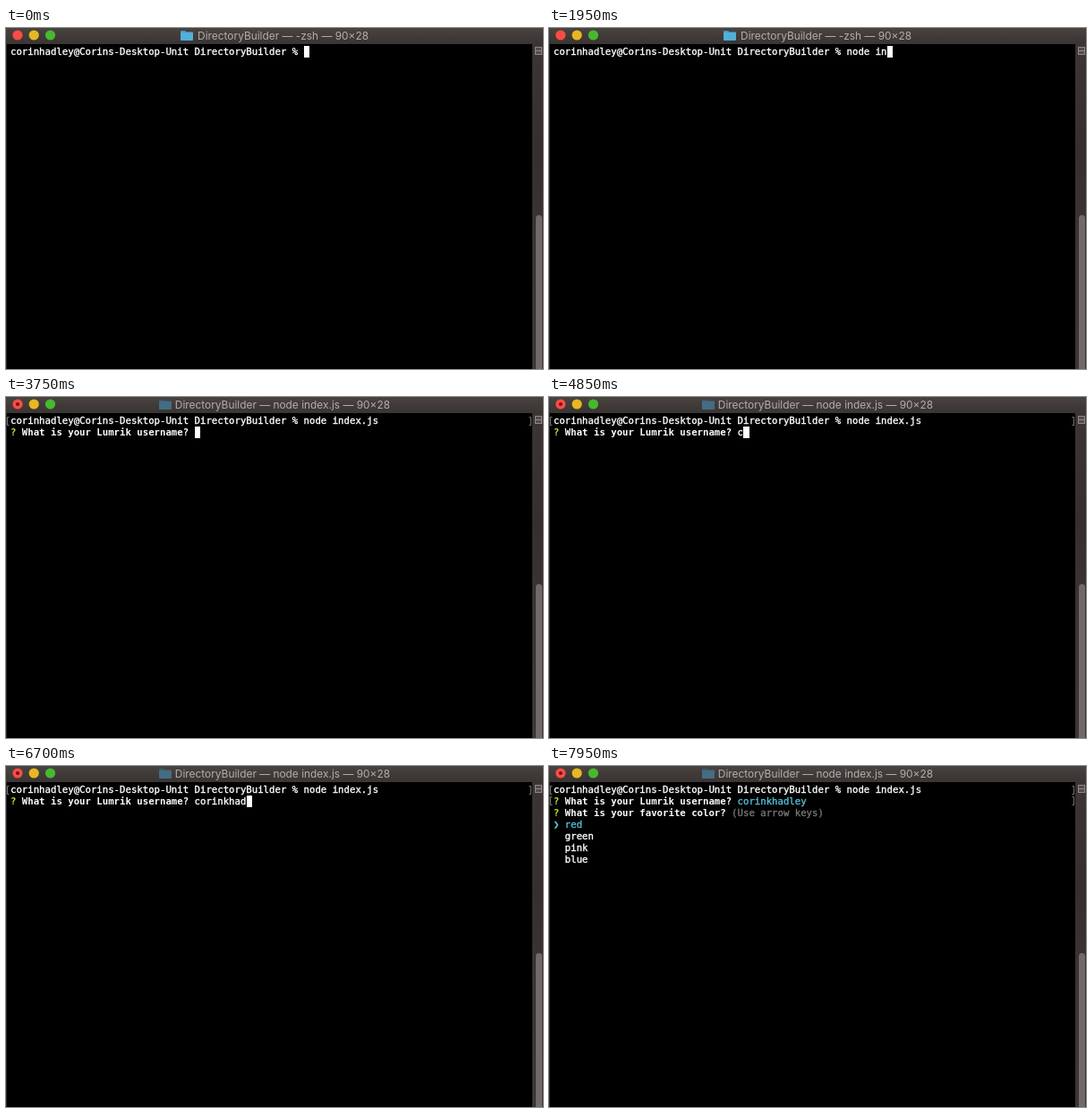
An HTML page with a canvas that plays this animation: 600x381 px, repeating every 8 s.

```html
<!DOCTYPE html>
<html lang="en">
<head>
<meta charset="utf-8">
<title>Terminal</title>
<style>
  html, body { margin: 0; width: 100%; height: 100%; overflow: hidden; background: #000; }
  canvas { display: block; width: 600px; height: 381px; }
</style>
</head>
<body>
<canvas id="stage" width="600" height="381"></canvas>
<script>
const ctx = document.getElementById('stage').getContext('2d');
const W = 600, H = 381, LOOP = 8000;
const CELL = 6.423, ROW = 12.88, LEFT = 5;
const MONO = '10.67px "DejaVu Sans Mono", "Liberation Mono", monospace';
const WHITE = '#fff', CYAN = '#55bfda', LIME = '#c8dc2c', DIM = '#777';

const FOLDER = 'DirectoryBuilder';
const PROMPT = `corinhadley@Corins-Desktop-Unit ${FOLDER} % `;
const COMMAND = 'node index.js ';
const QUESTION = 'What is your Lumrik username? ';
const ANSWER = 'corinkhadley';
const COLORS = ['red', 'green', 'pink', 'blue'];

// Key press times in ms; the last command key completes the file name.
const COMMAND_KEYS = [450, 700, 950, 1150, 1350, 1600, 1800];
const COMPLETE = 2150, ENTER = 2500, RUN = 2900, ASK = 3550, PICK = 7500;
const ANSWER_KEYS = [4850, 5050, 5250, 5400, 5700, 5900, 6150, 6400, 6600, 6850, 7050, 7250];

const pressed = (keys, t) => keys.filter(k => t >= k).length;

function box(color, x, y, w, h, r = 0) {
  ctx.fillStyle = color;
  ctx.beginPath();
  ctx.roundRect(x, y, w, h, r);
  ctx.fill();
}

function dot(color, x, y, r) {
  ctx.fillStyle = color;
  ctx.beginPath();
  ctx.arc(x, y, r, 0, Math.PI * 2);
  ctx.fill();
}

function gradient(y0, y1, ...colors) {
  const g = ctx.createLinearGradient(0, y0, 0, y1);
  colors.forEach((c, i) => g.addColorStop(i / (colors.length - 1), c));
  return g;
}

// Writes on the character grid and returns the next free column.
// A hairline stroke thickens the regular weight.
function write(text, col, row, color = WHITE, bold = false) {
  ctx.font = (bold ? 'bold ' : '') + MONO;
  ctx.textAlign = 'left';
  ctx.fillStyle = ctx.strokeStyle = color;
  ctx.lineWidth = 0.35;
  const y = Math.round(30.4 + row * ROW);
  [...text].forEach((ch, i) => {
    const x = LEFT + (col + i) * CELL;
    ctx.fillText(ch, x, y);
    if (!bold) ctx.strokeText(ch, x, y);
  });
  return col + text.length;
}

function cursor(col, row) {
  const x = LEFT + col * CELL + 0.2;
  const left = Math.round(x);
  box(WHITE, left, Math.round(20 + row * ROW), Math.round(x + CELL) - left, 13);
}

function brackets(row) {
  const y = Math.round(21.5 + row * ROW) + 0.5;
  ctx.strokeStyle = '#777';
  ctx.lineWidth = 1;
  for (const [x, d] of [[1.5, 2], [586.5, -2]]) {
    ctx.beginPath();
    ctx.moveTo(x + d, y);
    ctx.lineTo(x, y);
    ctx.lineTo(x, y + 9);
    ctx.lineTo(x + d, y + 9);
    ctx.stroke();
  }
}

function titleBar(running) {
  box(gradient(0, 18, '#4a4441', '#403a38', '#3a3533'), 0, 0, W, 18);
  dot('#fb4b46', 13, 8, 5.6);
  dot('#e7b723', 31.2, 8, 5.6);
  dot('#48b830', 49.5, 8, 5.6);
  if (running) dot('#6d0f0c', 13, 8, 2);

  const x = running ? 171 : 195;
  box(running ? '#38596c' : '#3f93bd', x, 3, 6, 4, 1);
  box(running ? '#436d84' : '#52afd9', x, 4.5, 14, 9.5, 1);

  ctx.font = '11.9px Inter, Roboto, sans-serif';
  ctx.textAlign = 'right';
  ctx.fillStyle = '#b3aeab';
  const job = running ? 'node index.js' : '-zsh';
  ctx.fillText(`${FOLDER} — ${job} — 90×28`, running ? 429 : 405, 13);
}

function scrollBar() {
  box(gradient(18, H, '#3b3634', '#35302e', '#3b3634', '#3c3735'), 588, 18, 12, H - 18);
  box('#524d4a', 591, 21, 8, 9);
  ctx.strokeStyle = '#8f8a87';
  ctx.lineWidth = 1;
  ctx.strokeRect(591.5, 21.5, 7, 8);
  box('#8f8a87', 592, 25, 6, 1);
  box('#706b68', 592, 209, 7, H - 209 + 8, 3.5);
}

function shell(t) {
  let col = write(PROMPT, 0, 0);
  const count = t >= COMPLETE ? COMMAND.length : pressed(COMMAND_KEYS, t);
  col = write(COMMAND.slice(0, count), col, 0);
  if (t >= ENTER) brackets(0);
  if (t < RUN) cursor(col, 0);
  else if (t < ASK) cursor(0, 1);
}

function askName(t) {
  write('?', 0, 1, LIME, true);
  let col = write(QUESTION, 2, 1, WHITE, true);
  const done = t >= PICK;
  col = write(ANSWER.slice(0, pressed(ANSWER_KEYS, t)), col, 1, done ? CYAN : WHITE);
  if (done) brackets(1);
  else cursor(col, 1);
}

function askColor() {
  write('?', 0, 2, LIME, true);
  const col = write('What is your favorite color? ', 2, 2, WHITE, true);
  write('(Use arrow keys)', col, 2, DIM);
  write('❯', 0, 3, CYAN);
  COLORS.forEach((name, i) => write(name, 2, 3 + i, i ? WHITE : CYAN));
}

function draw(t) {
  box('#000', 0, 0, W, H);
  box('#2c2c2c', 0, 18, 1, H - 18);
  titleBar(t >= RUN);
  scrollBar();
  shell(t);
  if (t >= ASK) askName(t);
  if (t >= PICK) askColor();
}

let start;
function tick(now) {
  start ??= now;
  draw((now - start) % LOOP);
  requestAnimationFrame(tick);
}
draw(0);
requestAnimationFrame(tick);
</script>
</body>
</html>
```
